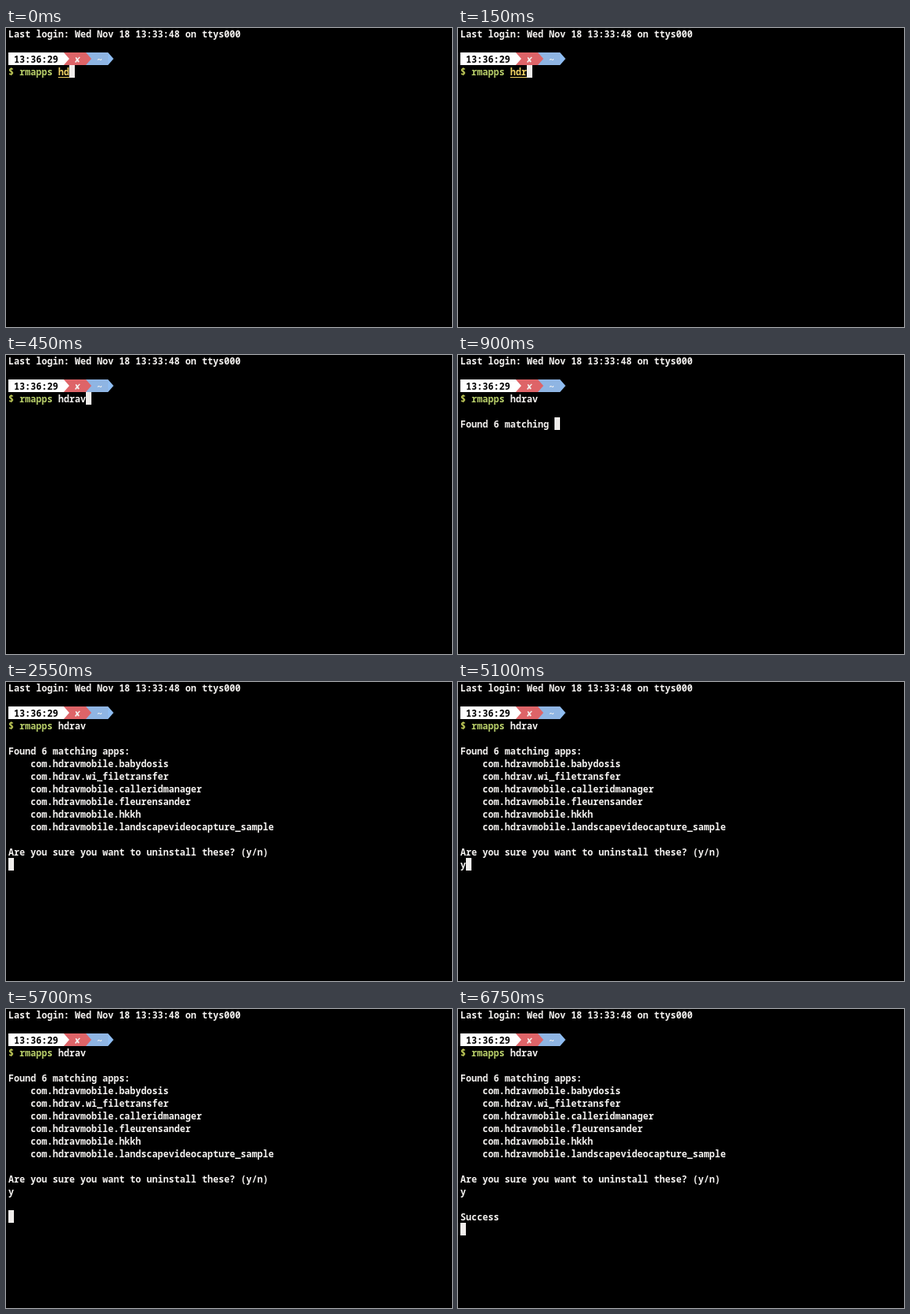
Animation of 564 by 379 pixels, one loop 8000 ms. Source, as an HTML page:

```html
<!DOCTYPE html>
<html lang="en">
<head>
<meta charset="utf-8">
<title>Terminal</title>
<style>
  html, body { margin: 0; width: 100%; height: 100%; overflow: hidden; background: #000; }
  svg { display: block; width: 564px; height: 379px; background: #000; }
  text {
    font: 600 11.667px "Noto Sans Mono", "DejaVu Sans Mono", monospace;
    font-variant-ligatures: none;
    white-space: pre;
    fill: #f4f2f0;
  }
  .dark { fill: #000; }
  .sign { fill: #c9d45c; }
  .cmd { fill: #b9cf6a; }
  .partial { fill: #f0d264; }
</style>
</head>
<body>
<svg viewBox="0 0 564 379" xmlns="http://www.w3.org/2000/svg">
  <g id="prompt"></g>
  <g id="output"></g>
  <rect id="underline" height="1" fill="#f0d264"/>
  <rect id="cursor" width="7" height="16" fill="#f1eeec"/>
</svg>
<script>
const LOOP = 8000, COL = 7, ROW = 16, LEFT = 3;
const ARG_COL = 9, ARG_ROW = 3;

// Terminal stream: each step appends its text at the given time.
const steps = [
  [0, "hd"],
  [150, "r"],
  [300, "a"],
  [450, "v"],
  [900, "\n\nFound 6 matching "],
  [1800, "apps:\n"],
  [2550, [
    "    com.hdravmobile.babydosis",
    "    com.hdrav.wi_filetransfer",
    "    com.hdravmobile.calleridmanager",
    "    com.hdravmobile.fleurensander",
    "    com.hdravmobile.hkkh",
    "    com.hdravmobile.landscapevideocapture_sample",
    "",
    "Are you sure you want to uninstall these? (y/n)",
    ""
  ].join("\n")],
  [5100, "y"],
  [5700, "\n\n"],
  [6750, "Success\n"]
];

const byId = id => document.getElementById(id);
const colX = col => LEFT + col * COL;
const rowY = row => row * ROW - 1;

function setAttrs(el, attrs) {
  for (const key in attrs) el.setAttribute(key, attrs[key]);
}

function add(parent, tag, attrs, content = "") {
  const el = document.createElementNS("http://www.w3.org/2000/svg", tag);
  setAttrs(el, attrs);
  el.textContent = content;
  parent.appendChild(el);
}

function write(parent, col, row, content, cls = "") {
  add(parent, "text", { x: colX(col), y: rowY(row) + 13, class: cls }, content);
}

function segment(parent, from, to, fill, tip = fill) {
  const y = rowY(2), a = colX(from), b = colX(to);
  add(parent, "rect", { x: a, y, width: b - a, height: ROW, fill });
  add(parent, "path", { d: `M${b} ${y}l${COL} ${ROW / 2}l${-COL} ${ROW / 2}z`, fill: tip });
}

function drawPrompt() {
  const g = byId("prompt");
  write(g, 0, 0, "Last login: Wed Nov 18 13:33:48 on ttys000");
  segment(g, 14, 18, "#8fb5e3", "#8fbdf2");
  segment(g, 10, 14, "#de6468");
  segment(g, 0, 10, "#fff");
  write(g, 1, 2, "13:36:29", "dark");
  write(g, 12, 2, "✘");
  write(g, 16, 2, "~");
  write(g, 0, ARG_ROW, "$", "sign");
  write(g, 2, ARG_ROW, "rmapps", "cmd");
}

function render(count) {
  const lines = steps.slice(0, count).map(s => s[1]).join("").split("\n");
  const partial = lines.length === 1 && lines[0].length < 4;
  const startCol = i => i ? 0 : ARG_COL;

  byId("output").replaceChildren();
  lines.forEach((line, i) => {
    if (line) write(byId("output"), startCol(i), ARG_ROW + i, line, partial ? "partial" : "");
  });

  const last = lines.length - 1;
  setAttrs(byId("cursor"), {
    x: colX(startCol(last) + lines[last].length),
    y: rowY(ARG_ROW + last)
  });
  setAttrs(byId("underline"), {
    x: colX(ARG_COL),
    y: rowY(ARG_ROW) + 15,
    width: partial ? lines[0].length * COL : 0
  });
}

let shown = 0;
const start = performance.now();

function tick() {
  const t = (performance.now() - start) % LOOP;
  const count = steps.filter(s => s[0] <= t).length;
  if (count !== shown) render(shown = count);
  requestAnimationFrame(tick);
}

drawPrompt();
tick();
</script>
</body>
</html>
```
